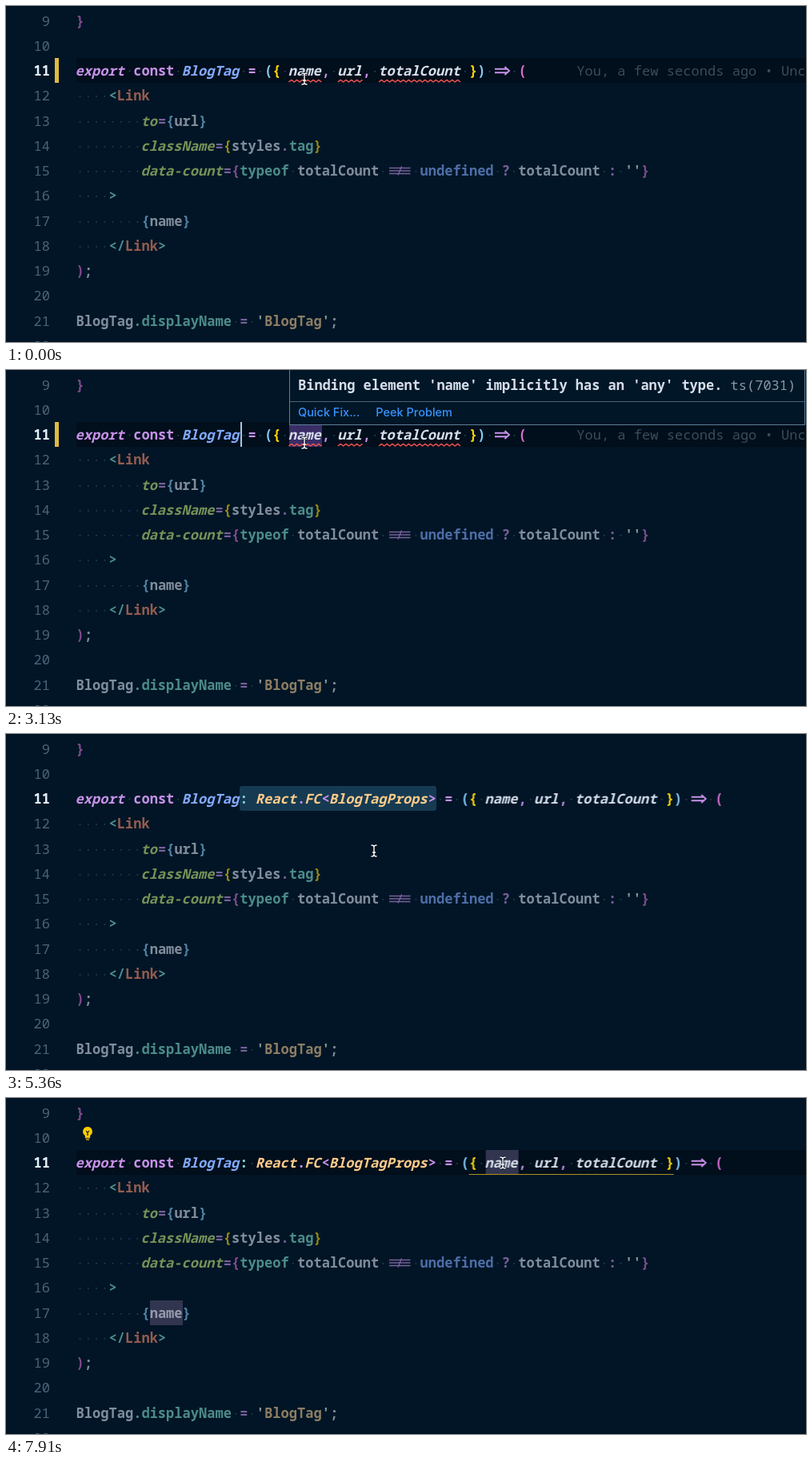
An HTML page for the animation above (8 s loop, 1000x420 px).

```html
<!DOCTYPE html>
<html lang="en">
<head>
<meta charset="utf-8">
<title>Code editor</title>
<style>
:root { --ch: 10.235px; --row: 31.25px; }
html, body { margin: 0; width: 100%; height: 100%; overflow: hidden; background: #011526; }
#stage {
  position: relative; width: 1000px; height: 420px; overflow: hidden; background: #011526;
  font: 500 17px/var(--row) "Noto Sans Mono", "DejaVu Sans Mono", monospace;
  letter-spacing: .035px; white-space: pre; color: #d6deeb;
}
#stage div, #stage > svg, #tail > svg { position: absolute; }
.num { left: 0; width: 55px; text-align: right; color: #4b6479; }
.num.now { color: #e4eef8; font-weight: 600; }
.code { left: 87.5px; }
.dim { opacity: .6; font-weight: 600; }
#live { left: 87.5px; top: 65px; font-weight: 600; }
.code s, #live s { color: #33495c; text-decoration: none; font-weight: 400; }
#live s { color: #24394b; }
.it { font-style: italic; position: relative; left: -1px; }
.k { color: #c792ea; } .w { color: #d6deeb; } .t { color: #7fdbca; }
.g { color: #c5e478; } .o { color: #f78c6c; } .b { color: #82aaff; }
.y { color: #ffd700; } .p { color: #da70d6; } .l { color: #87cefa; }
.c { color: #ffcb8b; } .q { color: #ecc48d; } .z { color: #d9f5dd; }
.lig { stroke: currentColor; fill: none; overflow: visible; }

/* editor decorations; row-high boxes positioned in columns */
.box { height: 31px; top: 0; left: calc(var(--col) * var(--ch)); width: calc(var(--n) * var(--ch)); }
#band { left: 88px; top: 65px; width: 912px; height: 31px; background: #010e1b; }
#bar { left: 61px; top: 65px; width: 5px; height: 31px; background: #e2b93d; }
.select { background: #153a52; border-radius: 3px; }
.hover { background: #3a2d66; }
.match { background: #32354f; }
.caret { width: 2px; margin-left: .5px; background: #a9c6e0; }
.scope { height: 1.5px; top: 29.5px; background: #a8951c; }
#blame { left: 421px; top: 0; color: #3a4c5a; font-weight: 400; }
.tip { box-sizing: border-box; border: 1px solid #5f7e97; background: #011627; letter-spacing: 0; font-weight: 600; }
#error { left: 354px; top: -2px; width: 645px; height: 71px; }
#error > * { left: 10px; }
#error .rule { left: 0; top: 40px; width: 100%; height: 1px; background: #48647a; }
#error .links { top: 37.5px; font: 500 14.5px/var(--row) Inter, "Open Sans", sans-serif; color: #3794ff; }
.links span { margin-right: 20px; }
.source { color: #8b98a5; font-weight: 500; }
#type { left: 600px; top: 24px; width: 187px; height: 44px; }
#type > div { left: 11px; top: 6px; }

/* timeline */
#stage .a { animation: 8s step-end infinite; }
#stage .shift { animation-name: shift; }
#stage .late { animation-name: late; }
#stage .unsaved { animation-name: unsaved; }
#stage .bandOn { animation-name: bandOn; }
#stage .blameOn { animation-name: blameOn; }
#stage .selOn { animation-name: selOn; }
#stage .hoverOn { animation-name: hoverOn; }
#stage .blink { animation-name: blink; }
#stage .blink2 { animation-name: blink2; }
#stage .clicked { animation-name: clicked; }
#stage .matchOn { animation-name: matchOn; }
#stage .bulbOn { animation-name: bulbOn; }
#stage .errorOn { animation-name: errorOn; }
#stage .typeOn { animation-name: typeOn; }
#stage .mouse { animation-name: mouse; }
@keyframes shift { 0% { transform: none; } 46.625%, 100% { transform: translateX(245.64px); } }
@keyframes late { 0% { opacity: 0; } 46.625%, 100% { opacity: 1; } }
@keyframes unsaved { 0% { opacity: 1; } 50.25%, 100% { opacity: 0; } }
@keyframes blameOn { 0% { opacity: 1; } 48.375%, 100% { opacity: 0; } }
@keyframes bandOn { 0%, 91.375%, 100% { opacity: 1; } 46.625% { opacity: 0; } }
@keyframes selOn { 0%, 91.375%, 100% { opacity: 0; } 46.625% { opacity: 1; } }
@keyframes hoverOn { 0%, 46.625%, 91.375%, 100% { opacity: 0; } 1.75%, 82% { opacity: 1; } }
@keyframes blink {
  0%, 9.25%, 20.375%, 33.5%, 54%, 65.25%, 78.25%, 91.375%, 100% { opacity: 0; }
  3.625%, 14.75%, 27.875%, 39.125%, 59.625%, 72.625%, 83.875% { opacity: 1; }
}
@keyframes blink2 { 0%, 97%, 100% { opacity: 0; } 91.375% { opacity: 1; } }
@keyframes clicked { 0% { opacity: 0; } 91.375%, 100% { opacity: 1; } }
@keyframes matchOn { 0% { opacity: 0; } 93.25%, 100% { opacity: 1; } }
@keyframes bulbOn { 0% { opacity: 0; } 97%, 100% { opacity: 1; } }
@keyframes errorOn { 0%, 46.625%, 100% { opacity: 0; } 1.75% { opacity: .5; } 3.625% { opacity: 1; } }
@keyframes typeOn { 0%, 91.375%, 100% { opacity: 0; } 82% { opacity: .5; } 83.875% { opacity: 1; } }
@keyframes mouse {
  0% { transform: translate(373px, 91px); }
  59.625% { transform: translate(374px, 100px); }
  61.5% { transform: translate(390px, 118px); }
  63.375% { transform: translate(420px, 135px); }
  65.25% { transform: translate(460px, 146px); }
  67.125% { transform: translate(500px, 148px); }
  69% { transform: translate(540px, 137px); }
  70.75% { transform: translate(575px, 114px); }
  72.625% { transform: translate(603px, 92px); }
  74.5% { transform: translate(617px, 81px); }
  76.375%, 100% { transform: translate(621px, 81px); }
}
</style>
</head>
<body>
<div id="stage"></div>
<script>
const CH = 10.235, ROW = 31.25;
const top11 = n => 65 + ROW * (n - 11);

const lig = (cols, d, w) =>
  `<svg class="lig" width="${cols * CH}" height="14" stroke-width="${w}"><path d="${d}"/></svg>`;
const LIGATURES = {
  '=>': lig(2, 'M1 5.8H16M1 10.2H16M13.5 3L19 8L13.5 13', 1.9),
  '!==': lig(3, 'M2 4.5H28.5M2 8H28.5M2 11.5H28.5M17.5 2.5L13 13.5', 1.4)
};

// Tokens are "<colour letter> <text>" joined by "¦"; a capital letter means italic.
const code = src => src.split('¦').map(tok => {
  const key = tok[0], text = tok.slice(2), low = key.toLowerCase();
  const body = LIGATURES[text] ||
    text.replace(/</g, '&lt;').replace(/ +/g, m => `<s>${'·'.repeat(m.length)}</s>`);
  return `<span class="${low}${key === low ? '' : ' it'}">${body}</span>`;
}).join('');

const box = (cls, col, n) => `<div class="box ${cls}" style="--col:${col};--n:${n}"></div>`;
const caret = (cls, col) =>
  `<div class="caret a ${cls}" style="left:${col * CH}px;top:0;height:31px"></div>`;

const lines = {
  9: 'p }',
  12: 'w     ¦t <¦o Link',
  13: 'w         ¦G to¦k =¦l {¦w url¦l }',
  14: 'w         ¦G className¦k =¦y {¦w styles¦k .¦t tag¦y }',
  15: "w         ¦G data-count¦k =¦p {¦t typeof ¦w totalCount ¦k !==¦w  ¦b undefined ¦k ? ¦w totalCount ¦k : ¦z ''¦p }",
  16: 'w     ¦t >',
  17: 'w         ¦l {¦w name¦l }',
  18: 'w     ¦t </¦o Link¦t >',
  19: 'p )¦w ;',
  21: "w BlogTag¦t .displayName ¦k = ¦z '¦q BlogTag¦z '¦w ;"
};

let rows = '';
for (let n = 9; n <= 22; n++) {
  const y = `style="top:${top11(n)}px"`;
  rows += `<div class="num${n === 11 ? ' now' : ''}" ${y}>${n}</div>`;
  if (lines[n]) rows += `<div class="code dim" ${y}>${code(lines[n])}</div>`;
}

const wave = (col, n) => {
  const x0 = col * CH, half = 3.4;
  let d = `M${x0} 30`;
  for (let i = 1; i * half <= n * CH + 1; i++) d += `L${x0 + i * half} ${i % 2 ? 27.4 : 30}`;
  return d;
};
const squiggles = `<svg class="a unsaved" style="left:0;top:0" width="300" height="32" fill="none"
  stroke="#ef5350" stroke-width="1.5" stroke-linejoin="round"><path d="${wave(6, 4) + wave(12, 3) + wave(17, 10)}"/></svg>`;

const live = `<div id="live">${box('select a selOn', 20, 24)}<div
  style="left:0;top:0">${code('K export ¦k const ¦B BlogTag')}</div><div
  class="a late" style="top:0;left:${20 * CH}px">${code('t : ¦C React¦k .¦C FC¦k <¦C BlogTagProps¦k >')}</div><div
  id="tail" class="a shift" style="top:0;left:${20 * CH}px">${
  box('hover a hoverOn', 6, 4)}${box('match a matchOn', 6, 4)}${box('scope a clicked', 4, 25)}<div style="left:0;top:0">${
  code('w  ¦k = ¦l (¦y {¦w  ¦W name¦k , ¦W url¦k , ¦W totalCount¦w  ¦y }¦l )¦w  ¦k =>¦w  ¦p (')}</div>${squiggles}<div
  id="blame" class="a blameOn">You, a few seconds ago • Uncommitted changes</div>${
  caret('blink2', 8)}</div>${caret('blink', 20)}</div>`;

const match17 = `<div class="match a matchOn" style="left:${88 + 9 * CH}px;top:${top11(17)}px;width:${4 * CH}px;height:31px"></div>`;

const tips = `<div id="error" class="tip a errorOn"><div style="top:4px">Binding element 'name' implicitly has an 'any' type. <span
  class="source">ts(7031)</span></div><div class="rule"></div><div class="links"><span>Quick Fix...</span><span>Peek Problem</span></div></div>
<div id="type" class="tip a typeOn"><div>${code('k var¦w  ¦W name¦k :¦w  ¦G string').replace(/·/g, ' ')}</div></div>`;

const bulb = `<svg class="a bulbOn" style="left:94px;top:35px" width="16" height="19">
  <path d="M8 1a6 6 0 0 0-3.2 11v2.5h6.4V12A6 6 0 0 0 8 1z" fill="#ffcc00"/>
  <path d="M6 6.2L8 8.2L10 6.2M8 8.2V12" fill="none" stroke="#011526" stroke-width="1.2"/>
  <path d="M5 14.7H11M6 17H10" stroke="#c9a51a" stroke-width="1.5"/></svg>`;

const beam = 'M-3.5 -7Q0 -7 0 -5Q0 -7 3.5 -7M0 -5V5M-3.5 7Q0 7 0 5Q0 7 3.5 7M-2 2H2';
const mouse = `<svg class="a mouse" style="left:0;top:0;overflow:visible" width="1" height="1" fill="none">
  <path d="${beam}" stroke="#06101b" stroke-width="3.2"/><path d="${beam}" stroke="#fff" stroke-width="1.4"/></svg>`;

document.getElementById('stage').innerHTML =
  '<div id="band" class="a bandOn"></div><div id="bar" class="a unsaved"></div>' +
  match17 + rows + live + bulb + tips + mouse;
</script>
</body>
</html>
```
